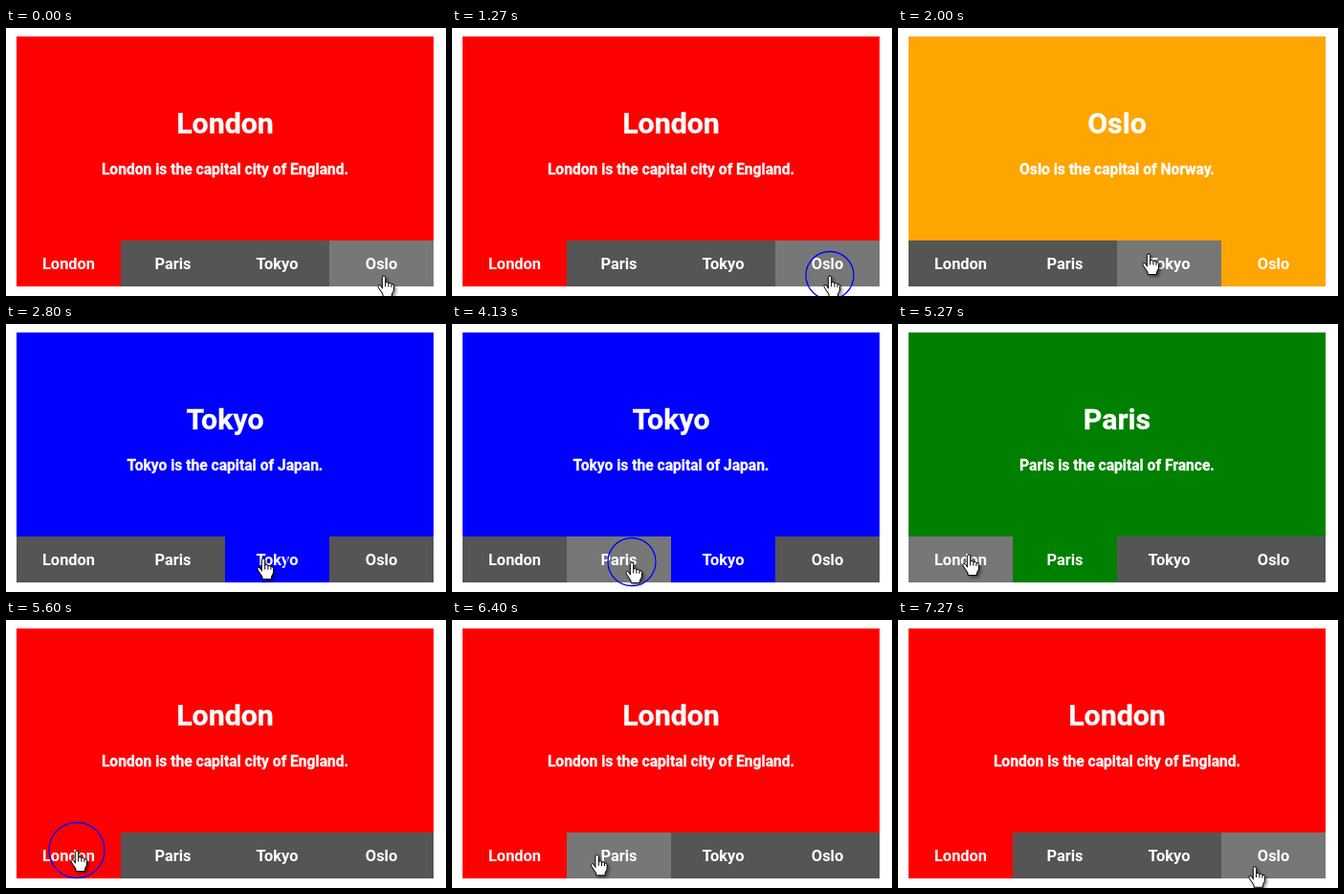
Animation of 460 by 280 pixels, one loop 7340 ms. Source, as an HTML page:

```html
<!DOCTYPE html>
<html lang="en">
<head>
<meta charset="utf-8">
<title>City tabs</title>
<style>
  html, body { margin: 0; width: 100%; height: 100%; overflow: hidden; background: #fff; }
  svg { display: block; width: 460px; height: 280px; }
  text { font: bold 16.4px Roboto, "Liberation Sans", sans-serif; fill: #fff; text-anchor: middle; }
  #title { font-size: 30.3px; stroke: #fff; stroke-width: .3px; }
  #info { font-size: 15.6px; stroke: #fff; stroke-width: .3px; }
  #hand { filter: drop-shadow(2px 2px 1.5px rgba(0, 0, 0, .45)); }
</style>
</head>
<body>
<svg viewBox="0 0 460 280">
  <rect id="panel" x="11" y="8.8" width="436" height="213.2"/>
  <text id="title" x="229" y="110"/>
  <text id="info" x="229" y="153"/>
  <g id="tabs"/>
  <circle id="ring" fill="none" stroke="blue" stroke-width="1.3"/>
  <g id="hand" stroke="#000" stroke-linejoin="round" stroke-linecap="round">
    <path fill="#fff" d="M-1.7 13V1.7a1.7 1.7 0 0 1 3.4 0V6.8q2.6-.8 3.2.8 2.5-.7 3 .9 2.6-.3 2.6 2V15l-2 4v2.5H-1V19l-4.6-6.8q-1.3-2.6.4-3 1.3-.1 3.5 3.2"/>
    <path fill="none" d="M1.7 7v4M4.9 7.8v3.4M7.9 8.8v2.6"/>
  </g>
</svg>
<script>
const $ = id => document.getElementById(id);
const LOOP = 7340, STEP = 1000 / 15, LAST = 109;
const LEFT = 11, WIDTH = 109;

// press: the step at which the tab is clicked
const cities = [
  { name: "London", color: "red", info: "the capital city of England", press: 83 },
  { name: "Paris", color: "green", info: "the capital of France", press: 62 },
  { name: "Tokyo", color: "blue", info: "the capital of Japan", press: 40 },
  { name: "Oslo", color: "orange", info: "the capital of Norway", press: 19 }
];

// Where the pointer rests, between two steps
const stops = [
  { x: 395, y: 259, from: 0, to: 25 },
  { x: 262, y: 236, from: 30, to: 30 },
  { x: 269, y: 245, from: 36, to: 46 },
  { x: 188, y: 249, from: 60, to: 64 },
  { x: 74, y: 241, from: 74, to: 88 },
  { x: 395, y: 259, from: 113, to: 113 }
];

function set(el, attrs) {
  for (const k in attrs) el.setAttribute(k, attrs[k]);
  return el;
}

function add(tag, attrs) {
  const el = document.createElementNS("http://www.w3.org/2000/svg", tag);
  return $("tabs").appendChild(set(el, attrs));
}

const tabs = cities.map(({ name }, i) => {
  const x = LEFT + WIDTH * i;
  const box = add("rect", { x, y: 222, width: WIDTH, height: 48 });
  add("text", { x: x + WIDTH / 2, y: 252 }).textContent = name;
  return box;
});

function pointer(step) {
  const i = stops.findLastIndex(s => s.from <= step);
  const a = stops[i], b = stops[i + 1];
  const u = Math.max(0, (step - a.to) / (b.from - a.to));
  const k = u * u * (3 - 2 * u);
  return [a.x + (b.x - a.x) * k, a.y + (b.y - a.y) * k];
}

function draw(ms) {
  const step = Math.min(LAST, Math.floor((ms + 5) / STEP));
  const [x, y] = pointer(step);
  const hover = Math.floor((x - LEFT) / WIDTH);

  // The page opens one step after the press
  const opened = cities.filter(c => c.press < step).sort((a, b) => b.press - a.press);
  const open = opened[0] || cities[0];
  $("panel").setAttribute("fill", open.color);
  $("title").textContent = open.name;
  $("info").textContent = `${open.name} is ${open.info}.`;
  tabs.forEach((box, i) =>
    box.setAttribute("fill", cities[i] === open ? open.color : i === hover ? "#777" : "#555"));

  // The click ring swells and shrinks over three steps
  const age = cities.map(c => step - c.press).find(a => a >= 0 && a < 3);
  set($("ring"), {
    cx: x, cy: y - .5,
    r: age === undefined ? 0 : 29 - 4 * Math.abs(age - 1)
  });
  $("hand").setAttribute("transform", `translate(${x} ${y})`);
}

const start = performance.now();
function tick() {
  draw((performance.now() - start) % LOOP);
  requestAnimationFrame(tick);
}
tick();
</script>
</body>
</html>
```
